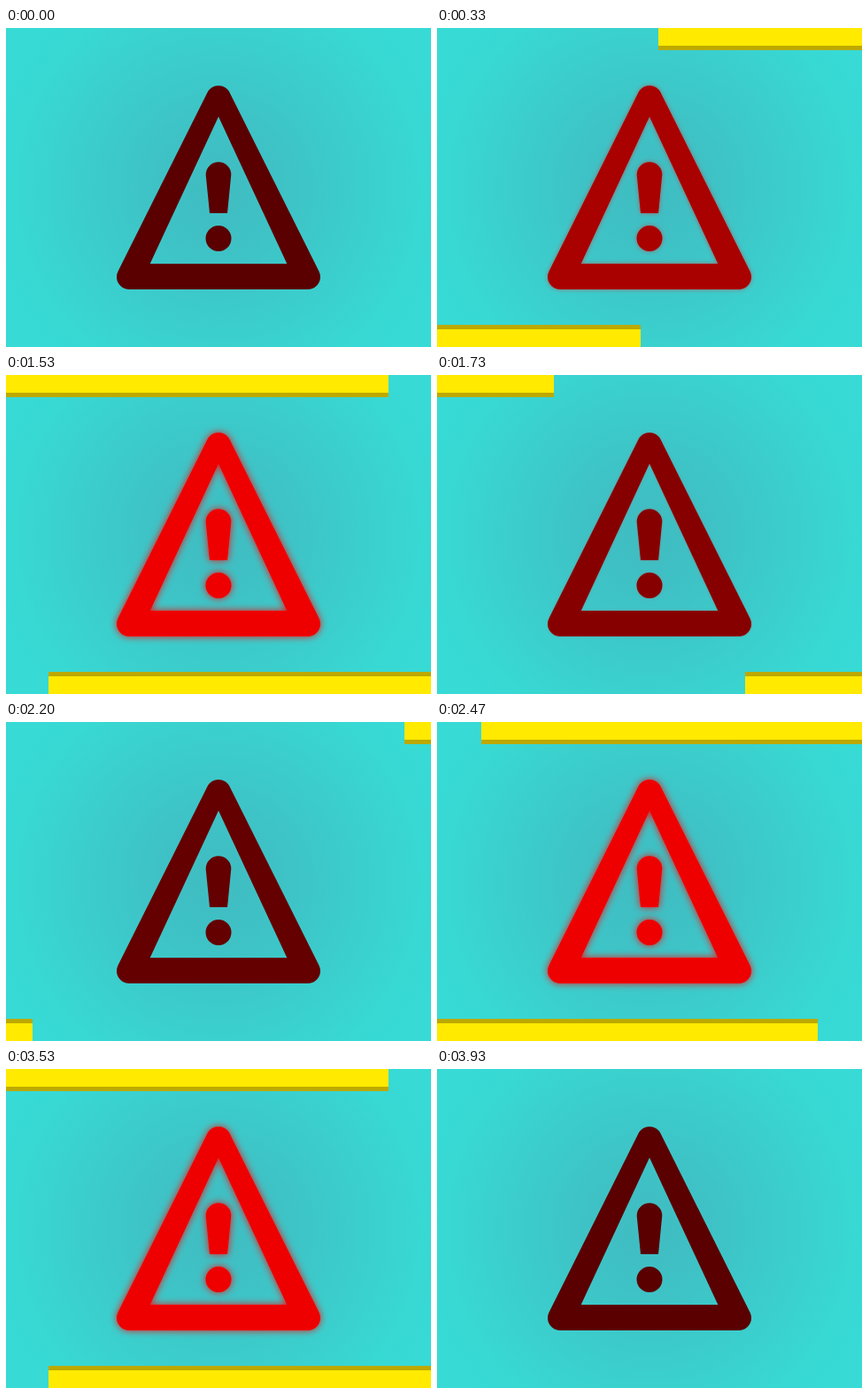
Recreate the animation shown at these times as an HTML page with a canvas. Size 480 px wide and 360 px high, loop 4070 ms.

```html
<!DOCTYPE html>
<html lang="en">
<head>
<meta charset="utf-8">
<title>Warning sign</title>
<style>
  html, body { margin: 0; width: 100%; height: 100%; overflow: hidden; }
  canvas { display: block; }
</style>
</head>
<body>
<canvas id="stage" width="480" height="360"></canvas>
<script>
const W = 480, H = 360;
const LOOP = 4070, CYCLE = 2000, STEP = 1000 / 15;
const BAR = 20, EDGE = 5;
const ctx = document.getElementById('stage').getContext('2d');

const background = ctx.createRadialGradient(W / 2, H / 2, 0, W / 2, H / 2, 270);
background.addColorStop(0, '#40bcc1');
background.addColorStop(0.3, '#3ec3c6');
background.addColorStop(0.85, '#38d8d3');
background.addColorStop(1, '#37dad5');

const clamp01 = v => Math.min(1, Math.max(0, v));

function buildSign() {
  const p = new Path2D();
  const r = 14, apex = 47.7, base = 295, half = 123.7, mid = W / 2;
  // rounded outer triangle
  p.moveTo(mid, base);
  p.arcTo(mid - half, base, mid, apex, r);
  p.arcTo(mid, apex, mid + half, base, r);
  p.arcTo(mid + half, base, mid, base, r);
  p.closePath();
  // sharp inner opening
  p.moveTo(mid, 100);
  p.lineTo(mid + 77.3, 266);
  p.lineTo(mid - 77.3, 266);
  p.closePath();
  // exclamation mark
  p.moveTo(mid - 10, 209);
  p.lineTo(mid - 14.3, 166);
  p.arc(mid, 165.5, 14.3, Math.PI, 0);
  p.lineTo(mid + 10, 209);
  p.closePath();
  p.moveTo(mid + 14.5, 237.5);
  p.arc(mid, 237.5, 14.5, 0, 2 * Math.PI);
  return p;
}
const sign = buildSign();

function drawBar(x, y, edgeY) {
  ctx.fillStyle = '#ffea00';
  ctx.fillRect(x, y, W, BAR);
  ctx.fillStyle = '#bda900';
  ctx.fillRect(x, edgeY, W, EDGE);
}

function draw(time) {
  // the motion advances in steps of 1/15 s
  const t = Math.floor((time % LOOP + 4) / STEP) * STEP % CYCLE;
  const enter = clamp01((t - 180) / 320);
  const leave = clamp01((t - 1501.3) / 320);
  const glow = enter - leave;
  const x = Math.round(W * (1 - enter - leave));

  ctx.fillStyle = background;
  ctx.fillRect(0, 0, W, H);

  ctx.save();
  ctx.shadowColor = `rgba(255, 0, 0, ${glow})`;
  ctx.shadowBlur = 10 * glow;
  ctx.fillStyle = `rgb(${Math.round(90 + 165 * glow)}, 0, 0)`;
  ctx.fill(sign, 'evenodd');
  ctx.restore();

  if (glow > 0) {
    drawBar(x, 0, BAR);
    drawBar(-x, H - BAR, H - BAR - EDGE);
  }
}

const start = performance.now();
function tick() {
  draw(performance.now() - start);
  requestAnimationFrame(tick);
}
tick();
</script>
</body>
</html>
```
